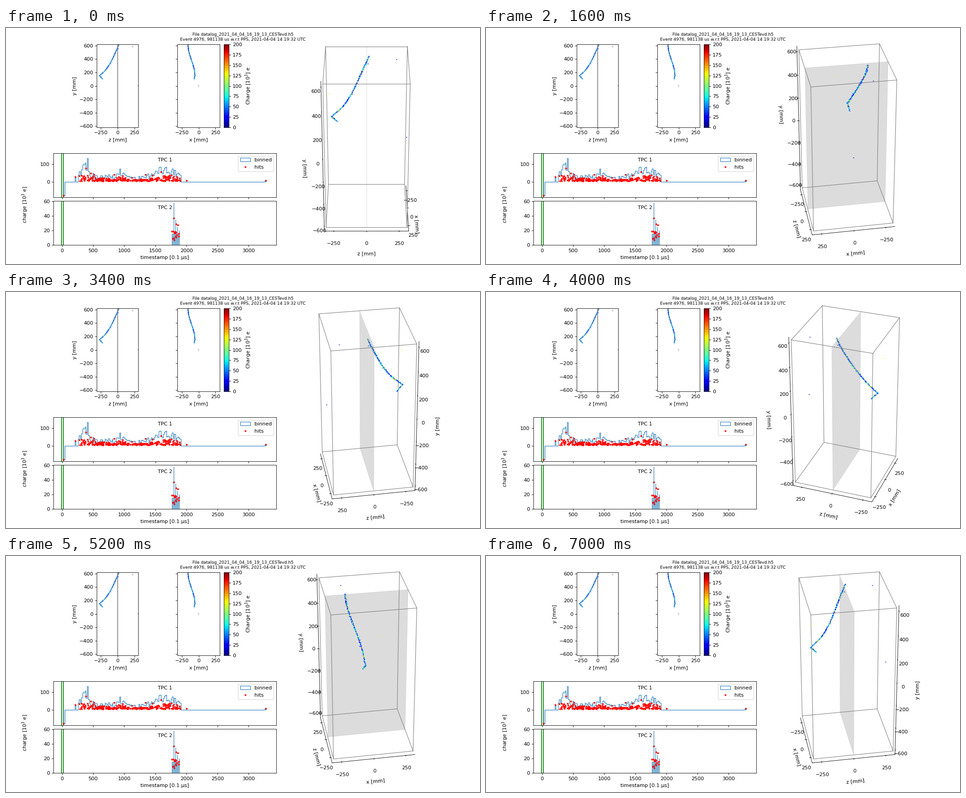
These frames come from a looping animation (1040x520 px, 7200 ms). A matplotlib script:

```python
from itertools import combinations, product

import matplotlib.pyplot as plt
import numpy as np
from matplotlib.animation import FuncAnimation
from mpl_toolkits.mplot3d.art3d import Poly3DCollection

WIDTH, HEIGHT, DPI = 1040, 520, 80
FRAMES, INTERVAL = 36, 200
HALF, HALF_Y = 310, 620          # detector half sizes in mm
ELEVATION = 30
BIN = 18                         # histogram bin width in 0.1 µs

rng = np.random.default_rng(4976)
fig = plt.figure(figsize=(WIDTH / DPI, HEIGHT / DPI), dpi=DPI)


def pixel_axes(left, top, right, bottom, **kwargs):
    """Add axes given by pixel edges measured from the top left."""
    return fig.add_axes([left / WIDTH, 1 - bottom / HEIGHT,
                         (right - left) / WIDTH, (bottom - top) / HEIGHT],
                        **kwargs)


def bump(t, center, width, height):
    return height * np.exp(-((t - center) / width) ** 2)


def make_hits():
    """Return x, y, z and charge: a bent track, its hook and stray hits."""
    t = np.linspace(0, 1, 270)
    track = np.array([-157 + 103 * t**2 * (3 - 2 * t),
                      612 - 459 * t,
                      20 - 205 * t - 82 * t**5])
    tip, end = np.array([[-54, 153, -267], [-68, 103, -222]])
    hook = tip[:, None] + np.outer(end - tip, np.linspace(0, 1, 28))
    points = np.hstack([track, hook])
    points += rng.normal(0, 2.5, points.shape)
    charge = np.clip(12 + rng.gamma(1.8, 30, points.shape[1]), 0, 200)
    strays = np.array([[-157, 584, 226, 18], [-150, 552, 12, 25],
                       [45, 397, -276, 125], [0, 0, 306, 8]]).T
    return np.hstack([np.vstack([points, charge]), strays])


x, y, z, charge = make_hits()
colors = dict(c=charge, cmap="jet", vmin=0, vmax=200, linewidths=0)

fig.suptitle("File datalog_2021_04_04_16_19_13_CESTevd.h5\n"
             "Event 4976, 981138 us w.r.t PPS, 2021-04-04 14:19:32 UTC",
             fontsize="small")

# Projections
ax_zy = pixel_axes(199, 36.4, 290.4, 218.6)
ax_xy = pixel_axes(376.1, 36.4, 468.9, 218.6)
for ax, values, label, limit in ((ax_zy, z, "z [mm]", 309),
                                 (ax_xy, x, "x [mm]", 316)):
    dots = ax.scatter(values, y, s=2, **colors)
    ax.set(xlim=(-limit, limit), ylim=(-617, 617), xlabel=label,
           xticks=[-250, 0, 250], yticks=range(-600, 601, 200))
ax_zy.axvline(0, color="gray")
ax_zy.set_ylabel("y [mm]")
ax_xy.tick_params(labelleft=False)
bar = fig.colorbar(dots, cax=pixel_axes(478.2, 36.4, 489.1, 218.6),
                   ticks=range(0, 201, 25))
bar.set_label("Charge [$10^3$] e")

# Charge against time
ax_t1 = pixel_axes(104, 276.2, 593, 373.2)
ax_t2 = pixel_axes(104, 381.4, 593, 478.4)
for ax, name in ((ax_t1, "TPC 1"), (ax_t2, "TPC 2")):
    for time in (-5, 25):
        ax.axvline(time, color="g")
    ax.set_title(name, fontsize=10, y=0.75)
    ax.set(xlim=(-139, 3446), xticks=range(0, 3001, 500))


def activity(t):
    """Typical charge per bin over the drift time."""
    return (28 + bump(t, 375, 85, 75) + bump(t, 930, 60, 25)
            + bump(t, 1650, 200, 35))


edges = 23 + BIN * np.arange(182)
middles = edges[:-1] + BIN / 2
busy = (middles > 255) & (middles < 1920)
binned = np.where(busy, activity(middles), 0)
binned *= rng.uniform(0.4, 1.5, middles.size)
lone = np.array([[25, -75], [213, 28], [2003, 8], [3275, 8]])
binned[[0, 10, -1]] = lone[[0, 1, 3], 1]
ax_t1.hist(middles, edges, weights=binned, histtype="step", color="C0",
           label="binned")

hit_t = rng.uniform(260, 1910, 270)
level = activity(hit_t)
hit_q = 6 + np.minimum(rng.exponential(0.24 * level), 20 + 0.5 * level)
ax_t1.plot(np.append(hit_t, lone[:, 0]), np.append(hit_q, lone[:, 1]),
           "r.", ms=5, label="hits")
ax_t1.set(ylim=(-87, 161.5), yticks=[0, 100])
ax_t1.legend(loc="upper right")

# A late burst: every second pulse after the start is tall and decays
pulse_t = np.linspace(1767, 1881, 9)
tall = (np.arange(9) % 2 == 0) & (pulse_t > 1790)
pulse_q = 16 + 42 * tall * np.exp(-(pulse_t - pulse_t[2]) / 37)
ax_t2.vlines(pulse_t, 0, pulse_q, color="C0", lw=1)
heads = np.array([[1767, 19], [1798, 37], [1830, 29], [1860, 28]])
low_t, low_q = rng.uniform(1775, 1882, 13), rng.uniform(7, 20, 13)
ax_t2.plot(np.append(low_t, heads[:, 0]), np.append(low_q, heads[:, 1]),
           "r.", ms=5)
ax_t2.set(ylim=(0, 60.5), yticks=[0, 20, 40, 60], xlabel="timestamp [0.1 µs]")
fig.text(41.4 / WIDTH, 1 - 389.6 / HEIGHT, "charge [$10^3$ e]", rotation=90,
         ha="center", va="center")

# Rotating detector; the vertical plot axis carries y
ax_3d = pixel_axes(564, 26, 1006, 468, projection="3d")
ax_3d.patch.set_alpha(0)
ax_3d.grid(False)
sizes = np.array([HALF, HALF, HALF_Y])
corners = [np.array(signs) * sizes for signs in product((-1, 1), repeat=3)]
for a, b in combinations(corners, 2):
    if np.count_nonzero(a != b) == 1:
        ax_3d.plot(*zip(a, b), color="gray", lw=1)
cathode = [(-HALF, 0, -HALF_Y), (HALF, 0, -HALF_Y),
           (HALF, 0, HALF_Y), (-HALF, 0, HALF_Y)]
shade = (0.5, 0.5, 0.5, 0.27)
ax_3d.add_collection3d(Poly3DCollection([cathode], facecolors=[shade],
                                        edgecolors=[shade], linewidths=0.5))
ax_3d.scatter(x, z, y, s=3, depthshade=False, **colors)

# Axis lines stand slightly outside the detector box
lim, lim_y = HALF * 25 / 24, HALF_Y * 25 / 24
ax_3d.set(xlim=(-lim, lim), ylim=(-lim, lim), zlim=(-lim_y, lim_y),
          xlabel="x [mm]", ylabel="z [mm]",
          xticks=[-250, 0, 250], yticks=[-250, 0, 250],
          zticks=range(-600, 601, 200))
ax_3d.set_zlabel("y [mm]", labelpad=20)
ax_3d.set_box_aspect((1, 1, 2))
for axis in (ax_3d.xaxis, ax_3d.yaxis, ax_3d.zaxis):
    axis.set_pane_color((1, 1, 1, 0))


def update(frame):
    azimuth = 360 * frame / FRAMES
    angle = np.radians(azimuth)
    # A tiny nudge settles which box edges carry the axes in edge-on views
    nudge = 1e-6 * (np.cos(angle) - np.sin(angle))
    ax_3d.view_init(ELEVATION, azimuth + nudge)
    return []


anim = FuncAnimation(fig, update, frames=FRAMES, interval=INTERVAL,
                     init_func=lambda: update(0), repeat=True, repeat_delay=0)
plt.show()
```
